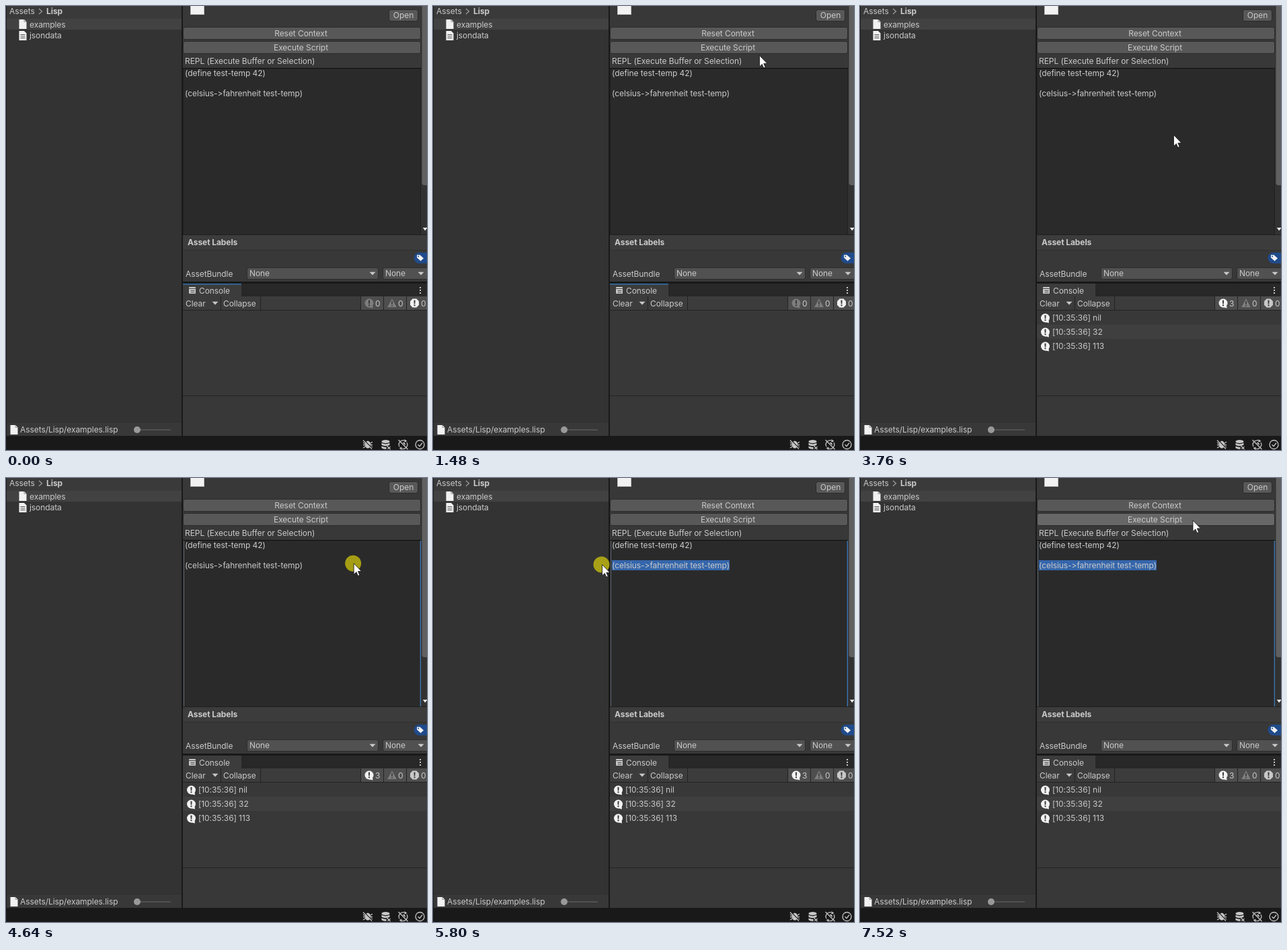
Animation of 626x659 px, one loop 8 s. Source, as an HTML page:

```html
<!DOCTYPE html>
<html lang="en">
<head>
<meta charset="utf-8">
<title>Lisp console</title>
<style>
html, body { margin: 0; width: 100%; height: 100%; overflow: hidden; background: #191919; }
svg { display: block; width: 626px; height: 659px; }
text {
  font: 12px Inter, Roboto, sans-serif;
  letter-spacing: -.07px;
  font-variant-ligatures: none;
  font-feature-settings: "calt" 0;
  fill: #cacaca;
  white-space: pre;
}
.bold { font-weight: 700; }
.mid { text-anchor: middle; }
.button { fill: #585858; stroke: #2b2b2b; }
.hover { fill: #676767; }
.pressed { fill: #46607c; }
.light { fill: #c8c8c8; }
.dim { fill: #7d7d7d; }
.white { fill: #f2f2f2; }
.line { fill: none; stroke: #c4c4c4; stroke-width: 1.3; }
.off { display: none; }
</style>
</head>
<body>
<svg viewBox="0 0 626 659">
  <defs>
    <path id="page" d="M0 0H7.5L11 3.5V14H0Z"/>
    <path id="down" d="M-4.5 -2.2H4.5L0 2.6Z"/>
    <path id="mark" d="M-1.1 -4.3H1.1L.8 1.3H-.8ZM-1 2.3H1V4.2H-1Z" fill="#383838"/>
    <g id="bubble">
      <circle r="6.5"/>
      <path d="M-1 6L5.5 7.5L5 3Z"/>
      <use href="#mark"/>
    </g>
    <g id="warning">
      <path d="M0 -6.5L6.8 6H-6.8Z"/>
      <use href="#mark" transform="translate(0 1) scale(.85)"/>
    </g>
    <g id="error">
      <path d="M-2.8 -6.5H2.8L6.5 -2.8V2.8L2.8 6.5H-2.8L-6.5 2.8V-2.8Z"/>
      <use href="#mark"/>
    </g>
  </defs>

  <!-- project panel -->
  <rect width="626" height="659" fill="#191919"/>
  <rect x="1" width="260" height="638" fill="#333"/>
  <rect x="1" width="260" height="19" fill="#3a3a3a"/>
  <rect x="1" y="19" width="260" height="16" fill="#424242"/>
  <text x="5" y="12">Assets</text>
  <path class="line" d="M49 4L53.5 8L49 12" style="stroke:#9a9a9a"/>
  <text class="bold" x="60" y="12">Lisp</text>
  <use href="#page" class="white" x="19.5" y="20"/>
  <path d="M27 20V23.5H30.5" fill="none" stroke="#999"/>
  <text x="35" y="32">examples</text>
  <use href="#page" class="white" x="19.5" y="37"/>
  <path d="M21.5 42.5H28.5M21.5 45H28.5M21.5 47.5H28.5" stroke="#555"/>
  <text x="35" y="48">jsondata</text>
  <rect x="1" y="618" width="260" height="20" fill="#383838"/>
  <rect x="1" y="617" width="260" height="1" fill="#2e2e2e"/>
  <use href="#page" class="white" x="6.5" y="622"/>
  <path d="M14 622V625.5H17.5" fill="none" stroke="#999"/>
  <text x="21" y="633">Assets/Lisp/examples.lisp</text>
  <rect x="195" y="628.5" width="50" height="1.2" fill="#606060"/>
  <circle cx="195" cy="629" r="5" fill="#999"/>

  <!-- inspector -->
  <rect x="263" width="363" height="409" fill="#383838"/>
  <rect x="274.5" y="-1" width="20" height="13.5" fill="#f2f2f2" stroke="#bbb"/>
  <rect class="button" x="569.5" y="5.5" width="43" height="17" rx="3"/>
  <text class="mid" x="591" y="18">Open</text>
  <rect id="reset" class="button" x="263.5" y="31.5" width="353" height="18" rx="3"/>
  <text class="mid" x="438.5" y="45">Reset Context</text>
  <rect id="execute" class="button" x="263.5" y="52.5" width="353" height="18" rx="3"/>
  <text class="mid" x="438.5" y="66">Execute Script</text>
  <text x="266" y="86">REPL (Execute Buffer or Selection)</text>
  <rect x="263" y="92" width="354" height="247" fill="#2a2a2a"/>
  <rect x="263" y="92" width="354" height="1" fill="#0d0d0d"/>
  <path d="M263.5 93V339M616.5 93V339" stroke="#202020"/>
  <g id="focus" class="off">
    <rect x="264" y="93" width="1" height="246" fill="#626c78"/>
    <rect x="615.7" y="93" width="1.3" height="246" fill="#3a79bb"/>
  </g>
  <rect id="selection" y="122" height="15" fill="#3566ab"/>
  <text x="266" y="104">(define test-temp 42)</text>
  <text id="code" x="266" y="134">(celsius-&gt;fahrenheit test-temp)</text>
  <rect x="617" width="9" height="339" fill="#323232"/>
  <path d="M618.5 0H626V266H622Q618.5 266 618.5 262Z" fill="#606060"/>
  <path class="white" d="M619.8 329H626.5L623.2 333.5Z"/>
  <rect x="263" y="339" width="363" height="1" fill="#1f1f1f"/>
  <rect x="263" y="340" width="363" height="22" fill="#3c3c3c"/>
  <rect x="263" y="362" width="363" height="1" fill="#303030"/>
  <text class="bold" x="270" y="355">Asset Labels</text>
  <rect x="606.5" y="366" width="26" height="16" rx="8" fill="#204b8b"/>
  <path class="white" d="M611 369.5H615.5L621 374.5L616.5 378.5L611 373.5Z"/>
  <circle cx="613.2" cy="371.7" r="1" fill="#204b8b"/>
  <text x="267" y="402">AssetBundle</text>
  <rect x="358.5" y="388.5" width="195" height="17" rx="3" fill="#515151" stroke="#2d2d2d"/>
  <text x="362" y="401">None</text>
  <use href="#down" class="light" x="545" y="397"/>
  <rect x="560.5" y="388.5" width="72" height="17" rx="3" fill="#515151" stroke="#2d2d2d"/>
  <text x="564" y="401">None</text>
  <use href="#down" class="light" x="617" y="397"/>

  <!-- console -->
  <rect x="263" y="412" width="363" height="19" fill="#282828"/>
  <rect x="263" y="412" width="87" height="20" fill="#3c3c3c"/>
  <rect id="tabline" x="263" y="412" width="87" height="1.5" fill="#3071ad"/>
  <rect class="light" x="272" y="417" width="10" height="10" rx="1"/>
  <path d="M272 419.5H282M274.5 422.5H280.5M274.5 425H280.5" stroke="#3c3c3c" stroke-width=".9"/>
  <text x="287" y="427">Console</text>
  <path class="light" d="M615 417h2v2h-2zM615 421h2v2h-2zM615 425h2v2h-2z"/>
  <rect x="263" y="431" width="363" height="207" fill="#383838"/>
  <rect x="263" y="431" width="363" height="20" fill="#3c3c3c"/>
  <rect x="528" y="431" width="98" height="20" fill="#4e4e4e"/>
  <path d="M319.5 431v20M378.5 431v20M527.5 431v20M561.5 431v20M595.5 431v20M263 451.5H626M263 578.5H626" stroke="#232323"/>
  <text x="267" y="446">Clear</text>
  <use href="#down" class="light" x="311" y="441"/>
  <text x="323" y="446">Collapse</text>
  <use id="infoIcon" href="#bubble" x="540" y="441"/>
  <text id="infoCount" x="549" y="446"></text>
  <use href="#warning" class="dim" x="574" y="441"/>
  <text x="583" y="446">0</text>
  <use id="errorIcon" href="#error" x="607.5" y="441"/>
  <text x="617" y="446">0</text>
  <g id="log" class="off">
    <rect x="263" y="473" width="363" height="21" fill="#3f3f3f"/>
    <use href="#bubble" class="white" x="275.5" y="463"/>
    <text x="286" y="467">[10:35:36] nil</text>
    <use href="#bubble" class="white" x="275.5" y="484"/>
    <text x="286" y="488">[10:35:36] 32</text>
    <use href="#bubble" class="white" x="275.5" y="505"/>
    <text x="286" y="509">[10:35:36] 113</text>
  </g>

  <!-- status bar -->
  <g transform="translate(538 651)">
    <ellipse class="light" rx="4" ry="5.5"/>
    <path class="line" d="M-7 -3L7 4M-7 5L7 -4M-7 .5H7"/>
    <path d="M-6 -7L7 6" stroke="#191919" stroke-width="1.5"/>
    <path class="line" d="M-7 -6.5L6 6.5"/>
  </g>
  <g transform="translate(564.5 651)">
    <ellipse class="light" cy="-4.5" rx="6" ry="2.5"/>
    <path class="light" d="M-6 -2.5Q0 1 6 -2.5V.5Q0 3.5 -6 .5ZM-6 2.2Q-2 4 1 3.7V6.8Q-4 7 -6 5Z"/>
    <path class="line" d="M2 2L7 7M7 3L3 6.5"/>
  </g>
  <g transform="translate(590.5 651)">
    <path class="line" d="M-5.5 3A6.3 6.3 0 0 1 2 -6M5.5 -3A6.3 6.3 0 0 1 -2 6M-7 -7L7 7"/>
    <path class="light" d="M-1 -3A3 3 0 0 1 3 1ZM2 -8L6 -5L2 -3.5ZM-2 8L-6 5L-2 3.5Z"/>
  </g>
  <circle class="line" cx="615.5" cy="651" r="6.5"/>
  <path class="line" d="M612.5 651L615 653.5L619 648.5"/>

  <g id="pointer">
    <circle id="press" cx="-.5" cy=".5" r="12" fill="#d6cc0c" fill-opacity=".72"/>
    <path d="M.5 .5V17L4.3 13.4L6.7 19L9.2 18L6.8 12.4H12Z" fill="#fff" stroke="#111" stroke-width=".8"/>
  </g>
</svg>
<script>
const LOOP = 8000, STEP = 80;
const ENTER = 360, PRESS = 2160, RUN = 2320, FOCUS = 4480, RELEASE = 5960;

// Pointer route: time, x, y; a time alone means the pointer rested until then.
const route = [
  [0, 577, 640], [ENTER], [680, 543, 400], [920, 508, 205], [1160, 494, 131],
  [1280, 431, 98], [1480, 485, 73], [1520, 486, 57], [1600, 485, 62], [2760],
  [2920, 482, 57], [3240, 385, 420], [3640, 452, 348], [3760, 466, 191], [3800],
  [4200, 560, 142], [FOCUS, 602, 132], [4840, 410, 119], [5120, 271.5, 122.5],
  [5320, 264, 126], [5480], [5560, 263, 127], [5640], [5800, 251, 128], [RELEASE],
  [6200, 301, 176], [6360], [6600, 464.5, 107.5], [6840, 500, 15],
  [7200, 483, 67], [7280], [7520, 494.5, 62.5], [LOOP]
];
route.forEach((key, i) => {
  if (key.length === 1) key.push(...route[i - 1].slice(1));
});

const el = id => document.getElementById(id);
const show = (id, on) => el(id).classList.toggle("off", !on);
const within = (t, from, to) => t >= from && t < to;

function pointerAt(t) {
  const i = route.findIndex(key => key[0] > t);
  const [t0, x0, y0] = route[i - 1], [t1, x1, y1] = route[i];
  const k = Math.floor((t - t0) / STEP) * STEP / (t1 - t0);
  return [x0 + (x1 - x0) * k, y0 + (y1 - y0) * k];
}

// Snap the dragged end of the selection to the nearest gap between letters.
function drawSelection(t) {
  const code = el("code");
  const end = 266 + code.getComputedTextLength();
  let start = end;
  if (t >= FOCUS) {
    const x = pointerAt(Math.min(t, RELEASE))[0];
    for (let i = 0; i < code.getNumberOfChars(); i++) {
      const edge = code.getStartPositionOfChar(i).x;
      if (Math.abs(edge - x) < Math.abs(start - x)) start = edge;
    }
  }
  el("selection").setAttribute("x", start);
  el("selection").setAttribute("width", end - start);
}

function draw(t) {
  const [x, y] = pointerAt(t);
  const ran = t >= RUN;
  const hovers = top => x > 264 && x < 616 && y >= top && y < top + 18;

  show("pointer", t >= ENTER);
  el("pointer").setAttribute("transform", `translate(${x} ${y})`);
  show("press", within(t, PRESS, 2400) || within(t, FOCUS, RELEASE));
  el("reset").classList.toggle("hover", hovers(32));
  el("execute").classList.toggle("hover", hovers(53));
  el("execute").classList.toggle("pressed", within(t, PRESS, RUN));

  show("tabline", t < PRESS);
  show("log", ran);
  el("infoCount").textContent = ran ? 3 : 0;
  el("infoIcon").setAttribute("class", ran ? "white" : "dim");
  el("errorIcon").setAttribute("class", ran ? "light" : "white");
  show("focus", t >= FOCUS);
  drawSelection(t);
}

const began = performance.now();
function tick() {
  draw((performance.now() - began) % LOOP);
  requestAnimationFrame(tick);
}
tick();
</script>
</body>
</html>
```
